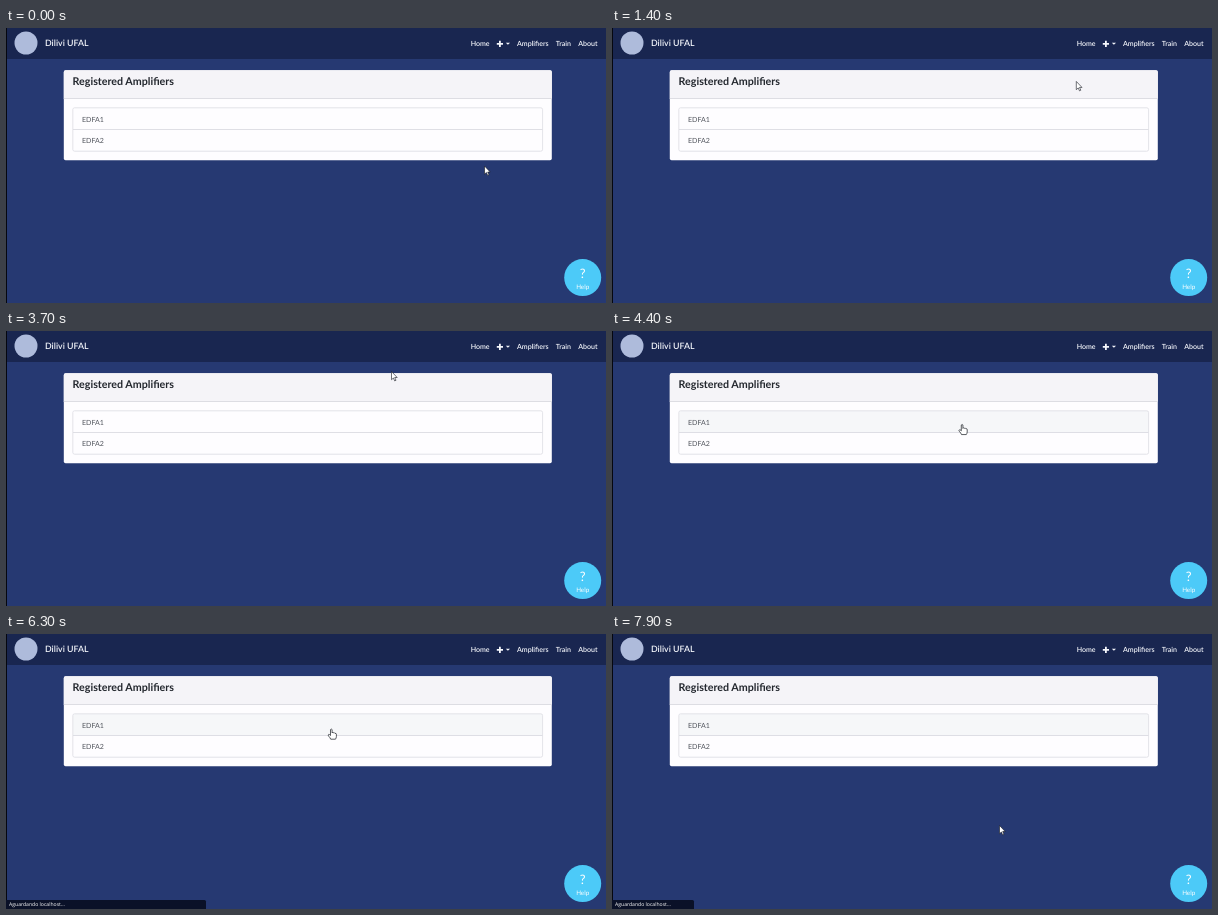
Animation of 600 by 275 pixels, one loop 8000 ms. Source, as an HTML page:

```html
<!DOCTYPE html>
<html lang="en">
<head>
<meta charset="utf-8">
<title>Registered Amplifiers</title>
<style>
html, body { margin: 0; width: 100%; height: 100%; overflow: hidden; background: #263972; }
svg { display: block; width: 600px; height: 275px; font: 7.05px Lato, sans-serif; }
text { white-space: pre; text-rendering: geometricPrecision; }
.nav { fill: #f4f6fb; font-weight: 600; }
.item { fill: #50545c; }
.status { fill: #fff; font: 500 5.1px "Open Sans", sans-serif; }
</style>
</head>
<body>
<svg viewBox="0 0 600 275">
  <rect width="600" height="275" fill="#263972"/>
  <rect width="600" height="31" fill="#192650"/>
  <rect width="1" height="275" fill="#05070f"/>

  <circle cx="20" cy="15" r="11.5" fill="#aebbdb"/>
  <text class="nav" x="39" y="17.9" font-size="8.8">Dilivi UFAL</text>
  <g class="nav">
    <text x="464.7" y="18.2">Home</text>
    <path d="M493 12.7h1.8v2.2h2.2v1.8h-2.2v2.2h-1.8v-2.2h-2.2v-1.8h2.2z"/>
    <path d="M499.8 14.7h4.2l-2.1 2.1z"/>
    <text x="511" y="18.2">Amplifiers</text>
    <text x="549.7" y="18.2">Train</text>
    <text x="572.2" y="18.2">About</text>
  </g>

  <rect x="57.8" y="42.2" width="488" height="90.1" rx="1.8" fill="#fefdff"/>
  <path d="M57.8 70.5V44a1.8 1.8 0 0 1 1.8-1.8h484.4a1.8 1.8 0 0 1 1.8 1.8V70.5z" fill="#f5f4f8"/>
  <rect x="57.8" y="70" width="488" height="1" fill="#dddde3"/>
  <text x="66.6" y="57.4" font-size="10.7" font-weight="700" fill="#23272e">Registered Amplifiers</text>

  <rect id="row1" x="67" y="80" width="469.5" height="21.5" fill="#f6f7f9"/>
  <rect id="row2" x="67" y="101.5" width="469.5" height="21.5" fill="#f6f7f9"/>
  <rect x="66.8" y="79.8" width="469.8" height="43.4" rx="1.8" fill="none" stroke="#dcdce2" stroke-width=".8"/>
  <rect x="67" y="101" width="469.5" height=".9" fill="#dcdce2"/>
  <text class="item" x="76" y="93.9">EDFA1</text>
  <text class="item" x="76" y="115.1">EDFA2</text>

  <circle cx="576.7" cy="249.6" r="18.5" fill="#4ccaf8"/>
  <g fill="#fff" text-anchor="middle">
    <text x="576.7" y="249.8" font-size="13">?</text>
    <text x="576.7" y="261.4" font-size="6.3">Help</text>
  </g>

  <g id="status">
    <path id="bar" fill="#0a1128"/>
    <text id="note" class="status" x="3" y="272.4"></text>
  </g>

  <path id="arrow" d="M0 0v8.2l1.9-1.7 1.3 2.9 1.3-.6-1.3-2.8h2.5z" fill="#fff" stroke="#14171f" stroke-width=".6"/>
  <path id="hand" d="M-.8 .6Q0-.5 .8 .6V4l.5-.5q.8-.3 1.1.5 1-.5 1.4.4 1.2-.3 1.3.8V7.6Q5 9 4.2 10.2H-.6Q-1.2 8.6-2.6 7.2-3.7 5.8-2.6 5.4-1.8 5.3-.8 6.5z"
    fill="#fff" stroke="#14171f" stroke-width=".7" stroke-linejoin="round"/>
</svg>
<script>
const LOOP = 8000, STEP = 100;
const $ = id => document.getElementById(id);
const show = (id, on) => { $(id).style.display = on ? "" : "none"; };

// Pointer tip: time, x, y
const path = [
  [0, 478.5, 138], [600, 473, 91], [1000, 471, 89], [2000, 452, -12],
  [2800, 398, -12], [3700, 385.5, 40.5], [4600, 345, 101],
  [5200, 332.5, 99], [5500, 325.3, 95], [7000, 325.3, 95], [7800, 387.5, 191.5], [8000, 387.5, 191.5]
];

function pointer(t) {
  const i = path.findIndex(p => p[0] > t);
  const [t0, x0, y0] = path[i - 1], [t1, x1, y1] = path[i];
  const u = (t - t0) / (t1 - t0), e = u * u * (3 - 2 * u);
  return [x0 + (x1 - x0) * e, y0 + (y1 - y0) * e];
}

function setStatus(t) {
  const waiting = t >= 5900;
  const width = waiting && t < 6900 ? 200 : 82;
  show("status", t >= 4900);
  $("bar").setAttribute("d", `M0 275V266H${width - 1.5}q1.5 0 1.5 1.5V275z`);
  $("note").textContent = waiting ? "Aguardando localhost..." : "localhost:8000/detail_amplifier/1";
}

function draw(t) {
  const [x, y] = pointer(t);
  const loading = t >= 5900;
  const over1 = y >= 80 && y < 101.5, over2 = y >= 101.5 && y < 123;
  const hand = over1 || over2;
  show("row1", over1 || loading);
  show("row2", over2 && !loading);
  show("hand", hand);
  show("arrow", !hand);
  $(hand ? "hand" : "arrow").setAttribute("transform", `translate(${x} ${y})`);
  setStatus(t);
}

function frame(now) {
  draw(Math.floor(now % LOOP / STEP) * STEP);
  requestAnimationFrame(frame);
}
draw(0);
requestAnimationFrame(frame);
</script>
</body>
</html>
```
